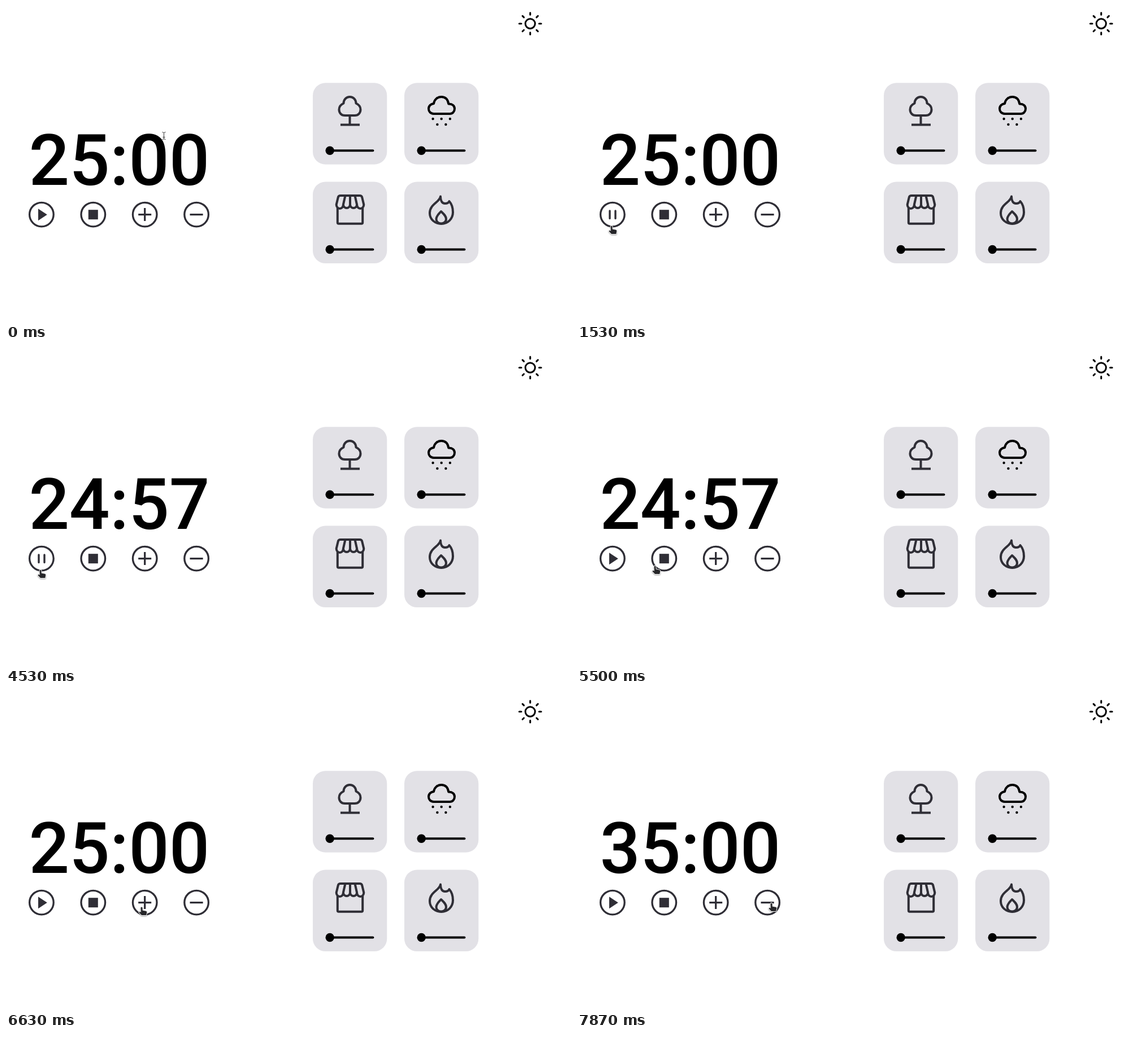
An HTML page for the animation above (8000 ms loop, 1000x560 px).

```html
<!DOCTYPE html>
<html lang="en">
<head>
<meta charset="utf-8">
<title>Focus timer</title>
<style>
  html, body { margin: 0; width: 100%; height: 100%; overflow: hidden; background: #fff; }
  svg { display: block; width: 1000px; height: 560px; }
  #clock { font: 500 126px Roboto, sans-serif; text-rendering: geometricPrecision; }
  .line { fill: none; stroke: #2f2e36; stroke-width: 4; stroke-linejoin: round; }
  .thin { stroke-width: 3.3; }
  .black { stroke: #000; }
  .solid { fill: #2f2e36; }
  .round { stroke-linecap: round; }
  .pointer { fill: #262629; stroke: #fff; stroke-width: 1.8; stroke-linejoin: round; paint-order: stroke;
    filter: drop-shadow(0 1px 1px rgba(0, 0, 0, .4)); }
</style>
</head>
<body>
<svg viewBox="0 0 1000 560">
  <g id="sun" class="line black round" transform="translate(927.8 31.3)" style="stroke-width:3">
    <circle r="8.6"/>
  </g>

  <text id="clock" x="40.5" y="316.8">25:00</text>

  <g id="buttons"></g>
  <path id="play" class="solid" d="M57 359.2L72.8 369.7L57 380.2Z"/>
  <path id="pause" class="line round" style="stroke-width:3.4" d="M58 363V376.6M68 363V376.6"/>
  <rect class="solid" x="145.8" y="361.2" width="17" height="17"/>
  <path class="line thin" d="M234.2 369.6H257.2M245.7 358.1V381.1M325.5 369.6H348.6"/>

  <g id="cards"></g>

  <g class="line">
    <path d="M600 194C593 194 589.5 189 589.5 183.5C589.5 178 593 174.5 597.5 172.5C597.5 166 602 161 608.5 161S619.5 166 619.5 172.5C624 174.5 627.5 178 627.5 183.5C627.5 189 624 194 617 194Z"/>
    <path d="M608.5 194V210.5M592 210.5H626"/>
  </g>

  <path class="line black" d="M757 191C751 191 748 186.5 748 182C748 177 752 173.5 757 173C758 166 763.5 161 770.5 161C777.5 161 782 165.5 783.3 173.5C790 173 794 177 794 182C794 187 790.5 191 785.5 191Z"/>
  <path class="line black round" style="stroke-width:4.4" d="M755.6 200h0M770.7 200h0M785.9 200h0M763.4 210h0M778.4 210h0"/>

  <g class="line">
    <path d="M592 336H626Q629.5 336 630.2 339L633.3 352a6.1 7 0 0 1-12.2 0a6.1 7 0 0 1-12.1 0a6.1 7 0 0 1-12.1 0a6.1 7 0 0 1-12.2 0L587.8 339Q588.5 336 592 336Z"/>
    <path d="M600.5 336L596.9 352M609 336V352M617.5 336L621.1 352"/>
    <path d="M586.8 358V383.5Q586.8 385.8 589 385.8H629Q631.2 385.8 631.2 383.5V358"/>
  </g>

  <g class="line">
    <path d="M769 337.5C769 345 772 350 777 350C781 350 783.5 348.5 784.5 346C789 351 791 358 791 365.5C791 377 782 386 770.5 386C759 386 750 378 750 367C750 351 768 347.5 769 337.5Z"/>
    <path d="M770 364C766 368.5 761.5 372 761.5 377.5C761.5 382 765 385.5 770 385.5S779 382 779 377.5C779 372 774.5 368.5 770 364Z"/>
  </g>

  <g id="cursor">
    <g id="beam" fill="none">
      <path stroke="#fff" stroke-width="2.4" d="M-3 -6.5Q0 -6.5 0 -4.5V4.5Q0 6.5 -3 6.5M3 -6.5Q0 -6.5 0 -4.5M0 4.5Q0 6.5 3 6.5"/>
      <path stroke="#333" stroke-width="1" d="M-3 -6.5Q0 -6.5 0 -4.5V4.5Q0 6.5 -3 6.5M3 -6.5Q0 -6.5 0 -4.5M0 4.5Q0 6.5 3 6.5M-2 2.5H2"/>
    </g>
    <path id="arrow" class="pointer" d="M.5 .5V13.6L3.5 10.9L5.9 16.4L8.1 15.4L5.8 10.1H9.8Z"/>
    <path id="hand" class="pointer" d="M-1.5 1.5Q0 -.5 1.5 1.5L1.7 6.5L8 7.8Q9.5 8.3 9.3 10L8.3 15H0L-4.5 10.2Q-4.3 8.2 -2.6 8.8L-1.2 10Z"/>
  </g>
</svg>
<script>
const LOOP = 8000, FPS = 30;
const $ = id => document.getElementById(id);

function add(parent, tag, attrs) {
  const el = document.createElementNS('http://www.w3.org/2000/svg', tag);
  for (const name in attrs) el.setAttribute(name, attrs[name]);
  $(parent).append(el);
}

for (let i = 0; i < 8; i++)
  add('sun', 'path', { d: 'M0 -15.8V-19.3', transform: `rotate(${i * 45})` });

for (let i = 0; i < 4; i++) {
  add('buttons', 'circle', { class: 'line thin', cx: 62.9 + i * 91.4, cy: 369.6, r: 21.3 });
  const x = 543 + (i % 2) * 162, y = 136.2 + (i >> 1) * 175.3;
  add('cards', 'rect', { x, y, width: 131.3, height: 144.6, rx: 22.5, fill: '#e2e1e6' });
  add('cards', 'path', { class: 'line black round', d: `M${x + 30} ${y + 120}H${x + 106.4}` });
  add('cards', 'circle', { cx: x + 30.2, cy: y + 120, r: 7.7 });
}

const hold = () => 0;
const linear = p => p;
const smooth = p => (1 - Math.cos(Math.PI * p)) / 2;
const settle = p => 1 - (1 - p) ** 2;

// Cursor hot spot: step, x, y, easing towards the next row
const path = [
  [4, 279.5, 230, smooth], [26, 88, 378, hold],
  [29, 88, 378, smooth], [33, 61, 390, hold], [40, 61, 389, hold],
  [153, 61, 389, linear], [165, 138, 382, settle], [175, 167, 374, hold],
  [194, 167, 374, linear], [199, 240, 377, settle], [205, 251, 378, hold],
  [224, 251, 378, smooth], [236, 344, 370, hold]
];
const readings = [
  [0, '25:00'], [77, '24:59'], [106, '24:58'], [136, '24:57'],
  [185, '25:00'], [211, '30:00'], [224, '35:00']
];
const latest = (rows, step) => Math.max(0, rows.findLastIndex(row => row[0] <= step));

function cursorAt(step) {
  const i = latest(path, step);
  const [start, x, y, ease] = path[i];
  const [end, nextX, nextY] = path[i + 1] || path[i];
  const p = end > start ? ease(Math.max(0, (step - start) / (end - start))) : 0;
  return [x + (nextX - x) * p, y + (nextY - y) * p];
}

function show(id, on) {
  $(id).style.display = on ? '' : 'none';
}

function draw(ms) {
  const step = Math.floor((ms % LOOP + 5) * FPS / 1000);
  const [x, y] = cursorAt(step);
  const kind = step >= 25 ? 'hand' : y > 346 ? 'arrow' : 'beam';
  for (const id of ['beam', 'arrow', 'hand']) show(id, id === kind);
  $('cursor').setAttribute('transform', `translate(${x.toFixed(2)} ${y.toFixed(2)})`);

  const running = step >= 46 && step < 143;
  show('pause', running);
  show('play', !running);
  $('clock').textContent = readings[latest(readings, step)][1];
}

const began = performance.now();
function tick() {
  draw(performance.now() - began);
  requestAnimationFrame(tick);
}
tick();
</script>
</body>
</html>
```
